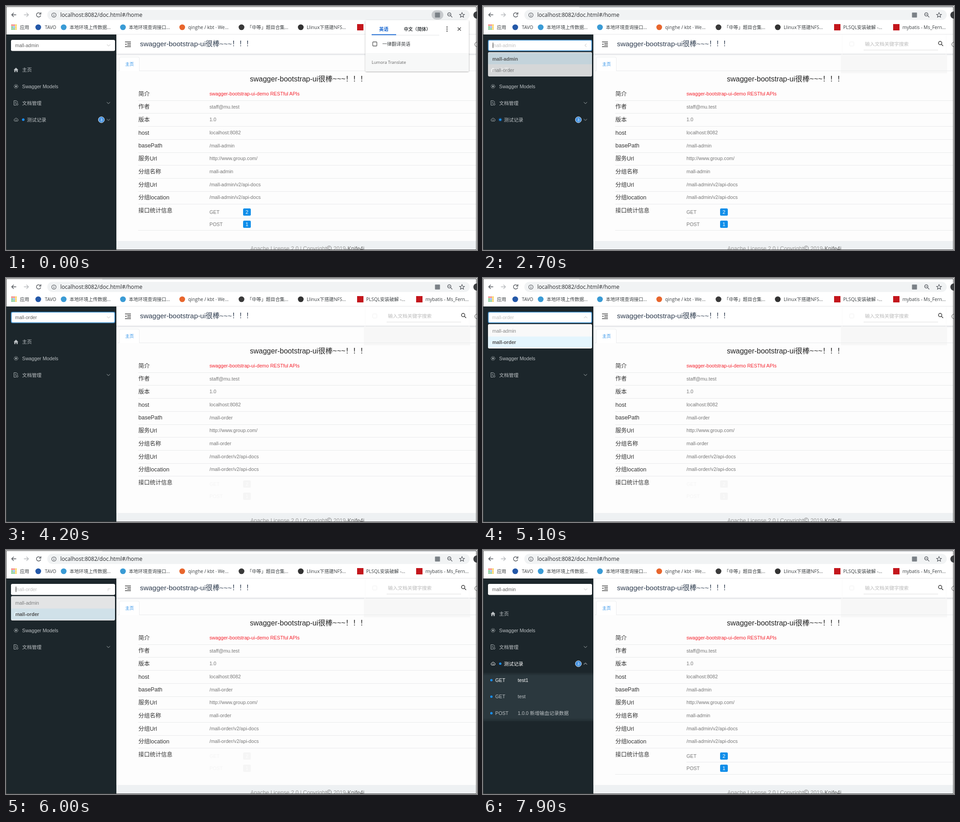
An HTML page that plays this animation: 1037 by 540 pixels, repeating every 8 s.

```html
<!DOCTYPE html>
<html lang="zh-CN">
<head>
<meta charset="utf-8">
<title>API docs</title>
<style>
html, body { margin: 0; width: 100%; height: 100%; overflow: hidden; background: #fff; }
svg { display: block; width: 1037px; height: 540px; }
text { font: 10.7px "Liberation Sans", "Noto Sans CJK SC", "Noto Sans CJK", sans-serif; white-space: pre; }
.chrome text { font: 10.3px "Open Sans", "Noto Sans CJK SC", "Noto Sans CJK", sans-serif; fill: #3c4043; }
.chrome .url { font-size: 12.1px; fill: #27292c; }
.line { fill: none; stroke: currentColor; }
.label { font-size: 12.5px; fill: #333; }
.value { fill: #777; }
.item { fill: #bcc1c4; color: #a9b0b3; }

/* 8 s timelines: 1 % = 80 ms */
.popup, .dropdown, .arrow, .menu-arrow, .submenu { animation: 8s linear infinite; }
.ghost, .strip, .admin, .order, .pick-admin, .pick-order, .opt-admin, .opt-order, .active,
.select-text, .caret, .focus, .stats, .item { animation: 8s step-end infinite; }

.popup { animation-name: popup; }
@keyframes popup { 0%, 21.25% { opacity: 1; } 24%, 100% { opacity: 0; } }
.ghost { animation-name: ghost; }
@keyframes ghost { 0% { visibility: hidden; } 23.75% { visibility: visible; } }
.strip { animation-name: strip; }
@keyframes strip { 0% { visibility: hidden; } 32.5% { visibility: visible; } }

.admin { animation-name: admin; }
@keyframes admin { 0%, 83.75% { visibility: visible; } 46.25% { visibility: hidden; } }
.order { animation-name: order; }
@keyframes order { 0%, 83.75% { visibility: hidden; } 46.25% { visibility: visible; } }
.stats { animation-name: stats; }
@keyframes stats { 0%, 83.75% { opacity: 1; filter: none; } 46.25% { opacity: .06; filter: grayscale(1); } }

.pick-admin { animation-name: pick-admin; }
@keyframes pick-admin { 0%, 82.5% { visibility: visible; } 43.75% { visibility: hidden; } }
.pick-order { animation-name: pick-order; }
@keyframes pick-order { 0%, 82.5% { visibility: hidden; } 43.75% { visibility: visible; } }
.opt-admin { animation-name: opt-admin; }
@keyframes opt-admin { 0%, 82.5% { font-weight: 700; fill: #666; } 43.75% { font-weight: 400; fill: #888; } }
.opt-order { animation-name: opt-order; }
@keyframes opt-order { 0%, 82.5% { font-weight: 400; fill: #888; } 43.75% { font-weight: 700; fill: #555; } }
.active { animation-name: active; }
@keyframes active { 0%, 80% { transform: translateY(-25px); } 37.5% { transform: none; } }
.select-text { animation-name: select-text; }
@keyframes select-text {
  0%, 43.75%, 66.25%, 82.5% { fill: #666; }
  32.5%, 55%, 73.125% { fill: #c2c2c2; }
}
.caret { animation-name: caret; }
@keyframes caret {
  0%, 38.75%, 63.75%, 80% { visibility: hidden; }
  32.5%, 57.5%, 73.75% { visibility: visible; }
}
.focus { animation-name: focus; }
@keyframes focus { 0%, 67%, 91.25% { visibility: hidden; } 32.5%, 75.6% { visibility: visible; } }
.dropdown { animation-name: dropdown; }
@keyframes dropdown {
  0%, 32.5%, 46.25%, 55%, 68.5%, 73.125%, 84.4%, 100% { opacity: 0; }
  34%, 44.9%, 56.5%, 66.25%, 75.2%, 82.5% { opacity: 1; }
}
.arrow { animation-name: arrow; }
@keyframes arrow {
  0%, 32.5%, 45.625%, 55%, 68.75%, 73.125%, 84.9%, 100% { transform: rotate(0deg); }
  35%, 43.125%, 57.5%, 66.25%, 75.625%, 82.5% { transform: rotate(180deg); }
}

.home { animation-name: hover-home; }
@keyframes hover-home { 0%, 52.5% { fill: #bcc1c4; color: #a9b0b3; } 51.25% { fill: #fff; color: #fff; } }
.models { animation-name: hover-models; }
@keyframes hover-models {
  0%, 70%, 86.9% { fill: #bcc1c4; color: #a9b0b3; }
  68.75%, 84.4% { fill: #fff; color: #fff; }
}
.docs { animation-name: hover-docs; }
@keyframes hover-docs {
  0%, 71.25%, 89.4% { fill: #bcc1c4; color: #a9b0b3; }
  70%, 86.9% { fill: #fff; color: #fff; }
}
.tests { animation-name: hover-tests; }
@keyframes hover-tests { 0% { fill: #bcc1c4; color: #a9b0b3; } 89.4% { fill: #fff; color: #fff; } }
.first { animation-name: hover-first; }
@keyframes hover-first { 0% { fill: #bcc1c4; } 96.8% { fill: #fff; } }
.submenu { animation-name: submenu; }
@keyframes submenu { 0%, 92.5% { clip-path: inset(0 0 100% 0); } 96.25%, 100% { clip-path: inset(0); } }
.menu-arrow { animation-name: menu-arrow; }
@keyframes menu-arrow { 0%, 92.5% { transform: scaleY(1); } 96.25%, 100% { transform: scaleY(-1); } }
</style>
</head>
<body>
<svg viewBox="0 0 1037 540">
  <defs>
    <filter id="shadow" x="-10%" y="-20%" width="120%" height="150%">
      <feDropShadow dx="0" dy="1" stdDeviation="1.6" flood-opacity=".4"/>
    </filter>
    <linearGradient id="inset" x2="0" y2="1">
      <stop offset="0" stop-color="#1f292e"/><stop offset=".07" stop-color="#2b383e"/>
      <stop offset=".93" stop-color="#2b383e"/><stop offset="1" stop-color="#222d32"/>
    </linearGradient>
    <path id="chevron" d="M-3.5-1.8 0 1.8 3.5-1.8"/>
  </defs>
  <rect width="1037" height="540" fill="#fdfdfd"/>

  <!-- page header and tabs -->
  <rect x="243" y="63" width="793" height="43" fill="#fff"/>
  <path d="M243 106.5H1036" stroke="#d9dcdf" stroke-width="1.4"/>
  <path d="M243 108.2H1036" stroke="#f0f1f2" stroke-width="2"/>
  <g class="line" color="#444" stroke-width="1.3">
    <path d="M262 79.5H275M267 83H275M267 86.5H275M262 90H275"/>
    <path d="M265 82.5 262.5 84.8 265 87Z" fill="#444" stroke="none"/>
  </g>
  <text x="295" y="89" style="font-size:15.4px" fill="#2d3b4e">swagger-bootstrap-ui很棒~~~！！！</text>
  <path d="M838 97.5H1002" stroke="#ddd"/>
  <text x="841" y="88" fill="#bbb">输入文档关键字搜索</text>
  <g class="line" color="#333" stroke-width="1.4"><circle cx="1006.5" cy="82" r="3.7"/><path d="M1009.3 84.8 1013 88.5"/></g>
  <circle class="line" cx="1037" cy="85" r="5" color="#555"/>
  <g class="ghost">
    <rect x="788" y="107" width="234" height="42" fill="#f7f7f7"/>
    <path class="line" d="M790.5 63V107M1019.5 63V107" color="#fafafa"/>
    <rect class="line" x="807.5" y="79.5" width="9" height="9" rx="1" color="#f0f0f0"/>
  </g>
  <path d="M246 143.5H1036" stroke="#e9ebed"/>
  <path d="M249.500 144V116q0-3 3-3H290.500q3 0 3 3V144" fill="#fff" stroke="#ebedef"/>
  <text x="262.500" y="131.500" style="font-size:9.500px" fill="#2a8fe8">主页</text>

  <text x="537" y="167" style="font-size:16px" fill="#222">swagger-bootstrap-ui很棒~~~！！！</text>
  <g id="rows"></g>
  <rect x="243" y="520" width="793" height="20" fill="#eef1f3"/>
  <g fill="#999">
    <text x="538" y="540.500" style="font-size:12.1px">Apache License 2.0 | Copyright</text>
    <text x="721" y="540.500" style="font-size:12.1px">2019-<tspan fill="#666">Knife4j</tspan></text>
    <circle class="line" cx="711.500" cy="536" r="5" color="#777"/>
    <path class="line" d="M713.5 534.500a2.500 2.500 0 1 0 0 3" color="#777"/>
  </g>

  <!-- sidebar -->
  <rect x="1" y="63" width="242" height="477" fill="#1c262b"/>
  <g class="item home">
    <path d="M22 136.500 16.800 141.500H18.300V146.300H20.900V143H23.100V146.300H25.700V141.500H27.200Z"/>
    <text x="35.500" y="145.200">主页</text>
  </g>
  <g class="item models">
    <g class="line"><circle cx="22" cy="178" r="4.300" stroke-dasharray="2 1"/><circle cx="22" cy="178" r="1.500"/><path d="M19 175 25 181M25 175 19 181" stroke-width=".6"/></g>
    <text x="35.500" y="181.800">Swagger Models</text>
  </g>
  <g class="item docs">
    <g class="line"><path d="M22 219.500H17.500V209.500H23L25.500 212V214M19.500 213H23M19.500 215.500H21.500"/><circle cx="24.500" cy="217.500" r="2"/></g>
    <text x="35.500" y="218.600">文档管理</text>
    <use href="#chevron" class="line" x="225.500" y="214.500"/>
  </g>
  <g class="admin"><g class="item tests">
    <path class="line" d="M19.500 254.800a2.500 2.500 0 0 1 0-4.800 3 3 0 0 1 5.500 0 2.500 2.500 0 0 1 0 4.800ZM20.500 253 22 251.500 24 253"/>
    <circle id="ring" cx="38" cy="251.500" r="2.600" fill="none" stroke="#1890ff"/>
    <circle cx="38" cy="251.500" r="2.600" fill="#1890ff"/>
    <text x="46" y="255.500">测试记录</text>
    <circle cx="210" cy="251.700" r="6.600" fill="#3f8fe0" stroke="#e8eef2"/>
    <text x="210" y="255" text-anchor="middle" style="font-size:9px" fill="#fff">3</text>
    <g transform="translate(225.500 251.700)"><use href="#chevron" class="line menu-arrow"/></g>
  </g></g>
  <g class="submenu" id="submenu"><rect x="1" y="271" width="242" height="108" fill="url(#inset)"/></g>

  <!-- group select -->
  <rect x="11" y="75" width="229" height="24.500" rx="3" fill="#fff"/>
  <rect class="line focus" x="11.500" y="75.500" width="228" height="23.500" rx="3" color="#2f86c8" stroke-width="1.600"/>
  <g class="select-text">
    <text class="pick-admin" x="20" y="90.500">mall-admin</text>
    <text class="pick-order" x="20" y="90.500">mall-order</text>
  </g>
  <path class="caret" d="M22 81V93" stroke="#222"/>
  <g transform="translate(226 87)"><use href="#chevron" class="line arrow" color="#bbb"/></g>
  <g class="dropdown">
    <rect x="11" y="102" width="229" height="54" rx="3" fill="#f9f9f9"/>
    <rect class="active" x="11" y="129.500" width="229" height="24.500" fill="#e4f5fd"/>
    <text class="opt-admin" x="20.500" y="121.300">mall-admin</text>
    <text class="opt-order" x="20.500" y="145.500">mall-order</text>
  </g>

  <!-- browser bar -->
  <g class="chrome">
    <rect width="1037" height="62.500" fill="#fff"/>
    <path d="M243 62.500H1036" stroke="#e5e7e9"/>
    <path class="strip" d="M212 2.500H1036" stroke="#dee1e6" stroke-width="2"/>
    <rect x="91" y="8.500" width="930" height="22.500" rx="11.200" fill="#f1f3f4"/>
    <g class="line" color="#50545a" stroke-width="1.400">
      <path d="M22.500 19.500H12.500M17 15 12.500 19.500 17 24"/>
      <path d="M39.500 19.500H49.500M45 15 49.500 19.500 45 24" color="#b5b8bb"/>
      <path d="M75.500 16.500A4.800 4.800 0 1 0 76.500 21M76.800 14V18H72.800"/>
      <circle cx="105.500" cy="20" r="4.800" stroke-width="1.100"/><path d="M105.500 19V23M105.500 16.800V18" stroke-width="1.100"/>
      <circle cx="976" cy="18.500" r="3.600"/><path d="M978.700 21.200 982.500 25M974.300 18.500H977.700" stroke-width="1.200"/>
      <path d="M1004 14.500 1005.600 18.200 1009.500 18.500 1006.500 21 1007.500 24.800 1004 22.700 1000.500 24.800 1001.500 21 998.500 18.500 1002.400 18.200Z" stroke-width="1.100"/>
    </g>
    <rect class="popup" x="937" y="9.500" width="26" height="20.500" rx="10.200" fill="#c7cacd"/>
    <rect x="944.500" y="14.500" width="11" height="11" rx="1" fill="#7b8187"/>
    <circle cx="1037" cy="20" r="8" fill="#3b3d40"/>
    <text class="url" x="119.500" y="24.300">localhost:8082/doc.html#/home</text>
    <g id="marks"></g>
  </g>

  <!-- translation popup -->
  <g class="popup chrome">
    <rect x="791.500" y="31.500" width="227.500" height="113" rx="2" fill="#fff" filter="url(#shadow)"/>
    <rect x="791.500" y="104" width="227.500" height="40.500" fill="#f7f8f8"/>
    <path d="M859 64.500H954" stroke="#e3e5e7"/>
    <path d="M805 63.500H859" stroke="#1a68d1" stroke-width="2"/>
    <text x="821.500" y="55" style="font-weight:700;fill:#1a68d1">英语</text>
    <text x="876" y="55" style="font-weight:700;font-size:9.800px">中文（简体）</text>
    <g fill="#444"><circle cx="971" cy="46.500" r="1.300"/><circle cx="971" cy="51" r="1.300"/><circle cx="971" cy="55.500" r="1.300"/></g>
    <path class="line" d="M994.500 47.500 1001.500 54.500M1001.500 47.500 994.500 54.500" color="#444" stroke-width="1.400"/>
    <rect class="line" x="807.500" y="79.500" width="9" height="9" rx="1" color="#555" stroke-width="1.300"/>
    <text x="828.500" y="88">一律翻译英语</text>
    <text x="805" y="128" style="font-size:9.300px;fill:#666">Lumora Translate</text>
  </g>

  <path class="line" d="M.5 1.500H1035.500V539.500H.5Z" color="#3c3c3c"/>
</svg>
<script>
const $ = id => document.getElementById(id);
const text = (x, y, s, cls = '') => `<text x="${x}" y="${y}" class="${cls}">${s}</text>`;
const rule = (x, y) => `<path d="M${x} ${y}.5H1036" stroke="#e9eaeb"/>`;

// A "*" in a value stands for the chosen group.
const rows = [
  ['简介', 'swagger-bootstrap-ui-demo RESTful APIs'], ['作者', 'staff@mu.test'], ['版本', '1.0'],
  ['host', 'localhost:8082'], ['basePath', '/*'], ['服务Url', 'http://www.group.com/'],
  ['分组名称', '*'], ['分组Url', '/*/v2/api-docs'], ['分组location', '/*/v2/api-docs'], ['接口统计信息', '']
];
const valueText = (y, s) => s.includes('*')
  ? ['admin', 'order'].map(g => text(448, y, s.replace('*', 'mall-' + g), 'value ' + g)).join('')
  : text(448, y, s, 'value');
const stat = (y, name, n) => text(448, y + 4, name, 'value') +
  `<rect x="522" y="${y - 8}" width="17" height="16" rx="2.5" fill="#108ee9"/>
   <text x="530.5" y="${y + 3.7}" text-anchor="middle" fill="#fff">${n}</text>`;

$('rows').innerHTML = rows.map(([label, value], i) => {
  const y = 194 + 28.7 * i;
  return text(291.5, y + 4.6, label, 'label') + valueText(y + 3.8, value) +
    (i < 9 ? rule(291, Math.round(y + 14.7)) : '');
}).join('') + `<g class="stats">${stat(456, 'GET', 2)}${stat(483, 'POST', 1)}${rule(448, 469)}${rule(291, 496)}</g>`;
$('rows').querySelector('.value').style.fill = '#f5222d';

$('submenu').innerHTML += [['GET', 'test1', 'first'], ['GET', 'test', ''], ['POST', '1.0.0 新增输血记录数据', '']]
  .map(([method, name, cls], i) => {
    const y = 288 + 36.6 * i;
    return `<g class="item ${cls}"><circle cx="18.500" cy="${y}" r="2.6" fill="#1890ff"/>` +
      text(27, y + 3.7, method) + text(76.5, y + 3.7, name) + '</g>';
  }).join('');

// Bookmarks: icon centre, colour, text start, title
const marks = [
  [71, '#2458a8', 85.5, 'TAVO'], [127, '#3a9bd5', 140, '本地环境上传数据...'],
  [257.5, '#3a9bd5', 270.5, '本地环境查询接口...'], [388, '#e8662d', 401, 'qinghe / kbt · We...'],
  [518.5, '#3a3a3a', 531, '「中等」题目合集...'], [649, '#333', 662, 'Llinux下搭建NFS...'],
  [780, '#c4161c', 793, 'PLSQL安装破解 -...'], [910, '#c4161c', 923.5, 'mybatis - Ms_Fern...']
];
const dots = ['#e8453c', '#e8453c', '#f4b400', '#35a853', '#4285f4', '#f4b400', '#35a853', '#35a853', '#f4b400'];
$('marks').innerHTML = dots.map((c, i) =>
  `<rect x="${12 + i % 3 * 4.2}" y="${41 + Math.floor(i / 3) * 4.2}" width="2.8" height="2.8" fill="${c}"/>`).join('') +
  text(30.5, 51.3, '应用') + marks.map(([cx, color, x, s], i) =>
    (i > 5 ? `<rect x="${cx - 7}" y="40" width="14" height="14" fill="${color}"/>`
           : `<circle cx="${cx}" cy="47" r="6.3" fill="${color}"/>`) + text(x, 51.3, s)).join('');

// Status pulse: 1.2 s beat, restarted with every loop
function pulse() {
  const t = performance.now() % 8000;
  const p = (t + 300) % 1200 / 1200;
  const eased = p * p * (3 - 2 * p);
  $('ring').setAttribute('r', 2.6 * (.8 + 1.6 * eased));
  $('ring').setAttribute('opacity', .5 * (1 - eased));
  requestAnimationFrame(pulse);
}
pulse();
</script>
</body>
</html>
```
